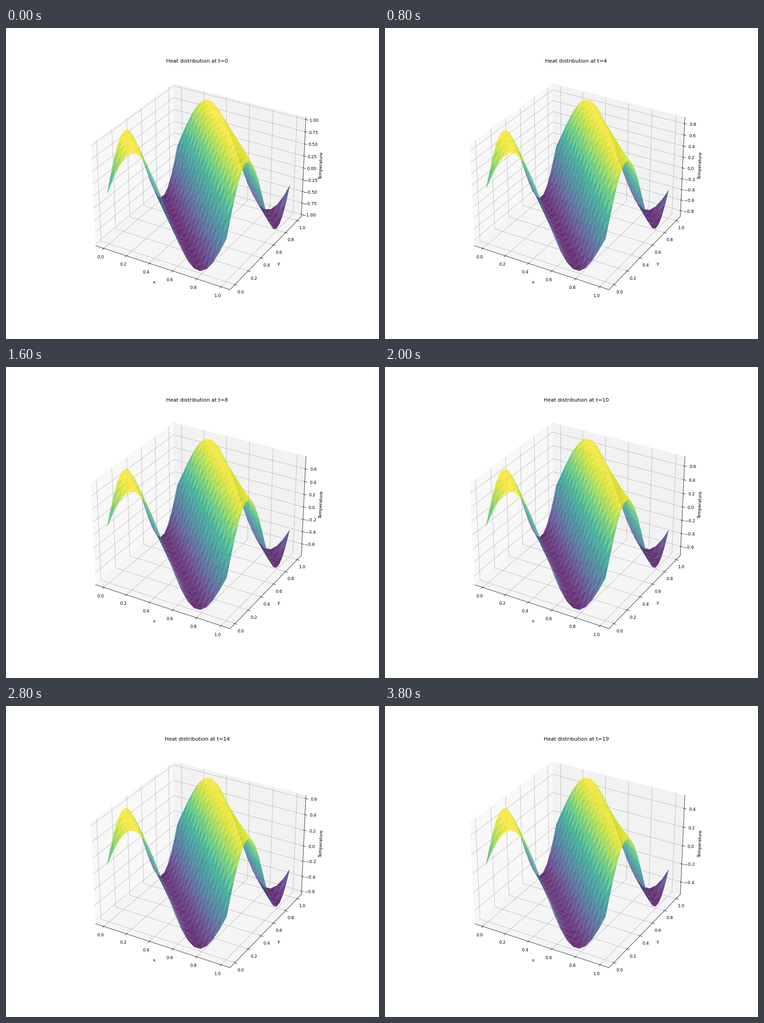
These frames come from a looping animation (820 px wide and 683 px high, 4000 ms). A matplotlib script:

```python
import numpy as np
import matplotlib.pyplot as plt
from matplotlib.animation import FuncAnimation

WIDTH, HEIGHT = 820, 683
DPI = WIDTH / 12
N = 20            # grid points per side
STEPS = 20
ALPHA = 0.01      # diffusivity
DT = 0.05

x = np.linspace(0, 1, N)
dx = x[1] - x[0]
X, Y = np.meshgrid(x, x)


def step(u):
    """One explicit heat-equation step with periodic edges."""
    lap = sum(np.roll(u, s, axis) for s in (1, -1) for axis in (0, 1)) - 4 * u
    return u + ALPHA * DT / dx**2 * lap


wave = 2 * np.pi * (N - 1) / (N - 0.5)
history = [np.sin(wave * (X + Y))]
while len(history) < STEPS:
    history.append(step(history[-1]))

fig = plt.figure(figsize=((WIDTH + 1e-6) / DPI, (HEIGHT + 1e-6) / DPI), dpi=DPI)
ax = fig.add_subplot(111, projection="3d")


def draw(t):
    ax.clear()
    ax.plot_surface(X, Y, history[t], cmap="viridis", alpha=0.8)
    ax.set_title(f"Heat distribution at t={t}")
    ax.set_xlabel("x")
    ax.set_ylabel("y")
    ax.set_zlabel("Temperature")
    return []


anim = FuncAnimation(fig, draw, frames=STEPS, init_func=lambda: draw(0),
                     interval=200, repeat=True)
plt.show()
```
